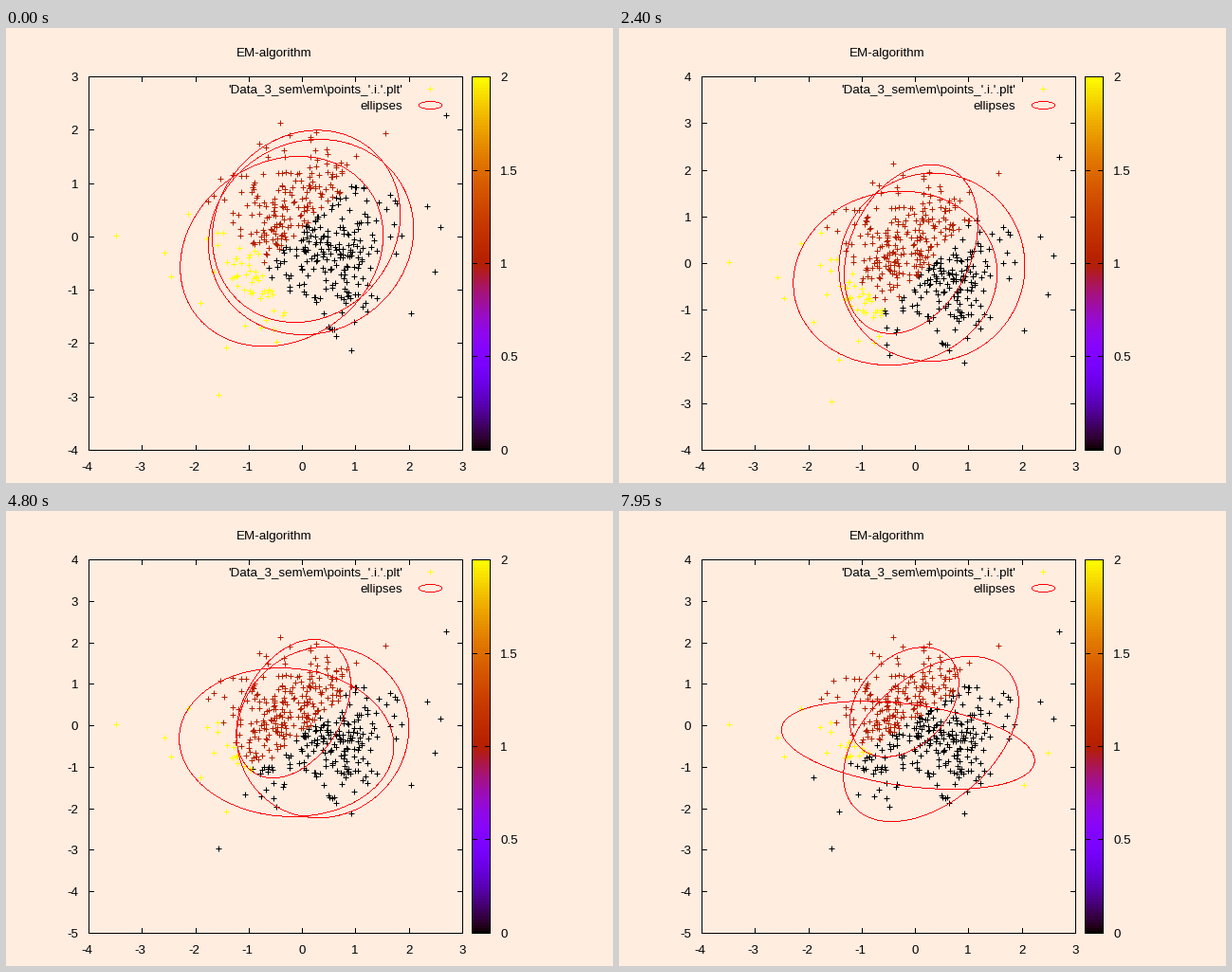
These frames come from a looping animation (640x480 px, 8000 ms). A matplotlib script:

```python
import numpy as np
import matplotlib.pyplot as plt
from matplotlib.animation import FuncAnimation

W, H, DPI = 640, 480, 100
PX = 72 / DPI                       # one pixel in points
LEFT, RIGHT, TOP, BOTTOM = 87, 481, 51, 445
BAR_LEFT, BAR_RIGHT = 491, 510
X_MIN, X_MAX = -4, 3
Y_RANGES = [(0, -4, 3), (9, -4, 4), (31, -5, 4)]    # first step, low, high
TICK = 5
RED, YELLOW = "#ff0000", "#ffff00"

# Key poses of each ellipse: centre x, centre y, half width, half height, tilt
STEPS = [0, 10, 32, 53]
LOW_LEFT = [(-.39, -.29, 1.90, 1.78, .17), (-.41, -.30, 1.87, 1.89, .10),
            (-.30, -.42, 2.01, 1.79, -.05), (-.14, -.49, 2.37, 1.06, -.35)]
UPPER = [(.07, .18, 1.76, 1.80, .12), (-.05, .25, 1.32, 1.86, .28),
         (-.17, .39, 1.07, 1.67, .36), (-.21, .55, 1.02, 1.32, .35)]
LOW_RIGHT = [(.16, -.02, 1.92, 1.83, .08), (.28, -.07, 1.79, 2.00, .00),
             (.38, -.18, 1.61, 2.06, .05), (.29, -.34, 1.64, 1.99, .45)]

# Cluster borders as (offset, slope) lines, and the limit of the far right part
UPPER_EDGE = [(.15, .93), (-.45, 1.29), (-.16, 1.12), (.15, .85)]
LEFT_EDGE = [(-.75, -.60), (-1.58, -1.33), (-2.85, -1.90), (-1.50, -1.00)]
LEFT_LIMIT = [(-.96, -.45), (-.45, 0), (-.30, .50), (.90, 2.60)]
FAR_LIMIT = [3.4, 3.4, 3.4, 2.5]

OUTLIERS = [(-3.48, .02), (-2.58, -.3), (-2.45, -.75), (-1.9, -1.25), (-1.56, -2.97),
            (-1.42, -2.08), (-2.13, .42), (2.7, 2.27), (2.34, .57), (2.6, .17),
            (2.48, -.66), (2.04, -1.44), (.92, -2.13), (1.56, 1.93), (-.41, 2.13)]
# Count, centre, spread
CLOUDS = [(125, (-.35, .35), (.52, .45)), (40, (.35, 1.05), (.4, .35)),
          (180, (.6, -.4), (.58, .65)), (50, (-1.0, -.85), (.35, .5))]
BODY = np.array([1.5, 1.65])        # half size of the dense part
RING = 45                           # points scattered just outside it


def y_range(step):
    return [(lo, hi) for first, lo, hi in Y_RANGES if step >= first][-1]


def to_px(x, y, lo, hi):
    return (LEFT + (x - X_MIN) * (RIGHT - LEFT) / (X_MAX - X_MIN),
            BOTTOM - (y - lo) * (BOTTOM - TOP) / (hi - lo))


def make_points():
    rng = np.random.default_rng(5)
    angle = rng.uniform(0, 2 * np.pi, RING)
    radius = rng.uniform(1, 1.25, RING)
    ring = np.column_stack([np.cos(angle), np.sin(angle)]) * radius[:, None] * BODY
    points = OUTLIERS + list(ring)
    for count, centre, spread in CLOUDS:
        while count:
            p = rng.normal(centre, spread)
            if np.hypot(*(p / BODY)) < 1:
                points.append(p)
                count -= 1
    return np.array(points).T


def blend(step, keys):
    return [np.interp(step, STEPS, column) for column in np.transpose(keys)]


def palette(v):
    """Colour for v in 0..1: black, violet, red, yellow."""
    return np.clip(np.stack([np.sqrt(v), v ** 3, np.sin(2 * np.pi * v)], -1), 0, 1)


def thin(x, y):
    """Pixels of a one-pixel curve: one per column, or per row where it is steep."""
    steep = np.abs(np.gradient(y)) > np.abs(np.gradient(x))
    along = np.where(steep, y, x)
    keep = np.abs(along - np.round(along)) < .11
    return np.round(x[keep]), np.round(y[keep])


fig = plt.figure(figsize=(W / DPI, H / DPI), dpi=DPI, facecolor="#ffede0")
ax = fig.add_axes([0, 0, 1, 1])
ax.axis("off")


def line(xs, ys):
    return ax.plot(xs, ys, color="black", lw=PX, antialiased=False, zorder=3)[0]


def label(x, y, text, align="center"):
    return ax.text(x, y, text, ha=align, va="baseline", zorder=5,
                   family="Liberation Sans", size=13.33 * PX)


def plus(color, z):
    return ax.plot([], [], "+", color=color, ms=6 * PX, mew=PX,
                   antialiased=False, zorder=z)[0]


def curve():
    return ax.plot([], [], ",", color=RED, antialiased=False, zorder=4)[0]


def frame_box(x0, x1):
    line([x0, x1, x1, x0, x0], [TOP, TOP, BOTTOM, BOTTOM, TOP])


def tick_pair(y, x0, x1):
    return [line([x0, x0 + TICK], [y, y]), line([x1 - TICK, x1], [y, y])]


def y_axis(lo, hi):
    artists = []
    for value in range(lo, hi + 1):
        y = round(to_px(0, value, lo, hi)[1])
        artists += tick_pair(y, LEFT, RIGHT)
        artists.append(label(76, y + 5, str(value), "right"))
    return artists


# Static parts
ramp = palette(np.linspace(1, 0, 128))[:, None, :]
ax.imshow(ramp, extent=(BAR_LEFT, BAR_RIGHT + 1, BOTTOM + 1, TOP), aspect="auto",
          interpolation="nearest", zorder=1)
frame_box(LEFT, RIGHT)
frame_box(BAR_LEFT, BAR_RIGHT)
for value in range(X_MIN, X_MAX + 1):
    x = round(to_px(value, 0, -4, 3)[0])
    line([x, x], [TOP, TOP + TICK])
    line([x, x], [BOTTOM - TICK, BOTTOM])
    label(x - 2 * (value < 0), 467, str(value))
for i in range(5):
    y = round(BOTTOM - i * (BOTTOM - TOP) / 4)
    tick_pair(y, BAR_LEFT, BAR_RIGHT)
    label(521, y + 5, f"{i / 2:g}", "left")
label(282.5, 30, "EM-algorithm")
label(418, 69, r"'Data_3_sem\em\points_'.i.'.plt'", "right")
label(418, 86, "ellipses", "right")
T = np.linspace(0, 2 * np.pi, 4000)
curve().set_data(*thin(447 + 12 * np.cos(T), 82 + 4 * np.sin(T)))
plus(YELLOW, 4).set_data([447], [64])

# Moving parts
axes_by_range = {(lo, hi): y_axis(lo, hi) for _, lo, hi in Y_RANGES}
X, Y = make_points()
marks = [plus(palette(np.array(v)), 2 + v / 10) for v in (0, .5, 1)]
ellipses = [(curve(), keys) for keys in (LOW_LEFT, UPPER, LOW_RIGHT)]
ax.set_xlim(0, W)
ax.set_ylim(H, 0)


def clusters(step):
    a, b = blend(step, UPPER_EDGE)
    c, d = blend(step, LEFT_EDGE)
    e, f = blend(step, LEFT_LIMIT)
    far = np.interp(step, STEPS, FAR_LIMIT)
    outer = (Y < c + d * X) & (X < e + f * Y) | (X - .7 * Y > far)
    upper = (Y > a + b * X) & (Y > -.9)
    return np.where(outer, 2, np.where(upper, 1, 0))


def update(n):
    step = n // 3
    span = y_range(step)
    for key, artists in axes_by_range.items():
        for artist in artists:
            artist.set_visible(key == span)
    px, py = np.round(to_px(X, Y, *span))
    owner = clusters(step)
    for k, mark in enumerate(marks):
        mark.set_data(px[owner == k], py[owner == k])
    for outline, keys in ellipses:
        cx, cy, a, b, tilt = blend(step, keys)
        x, y = cx + a * np.cos(T), cy + b * np.cos(T - np.arccos(tilt))
        outline.set_data(*thin(*to_px(x, y, *span)))
    return marks


anim = FuncAnimation(fig, update, frames=160, interval=50, repeat=True,
                     repeat_delay=0, blit=False)
plt.show()
```
